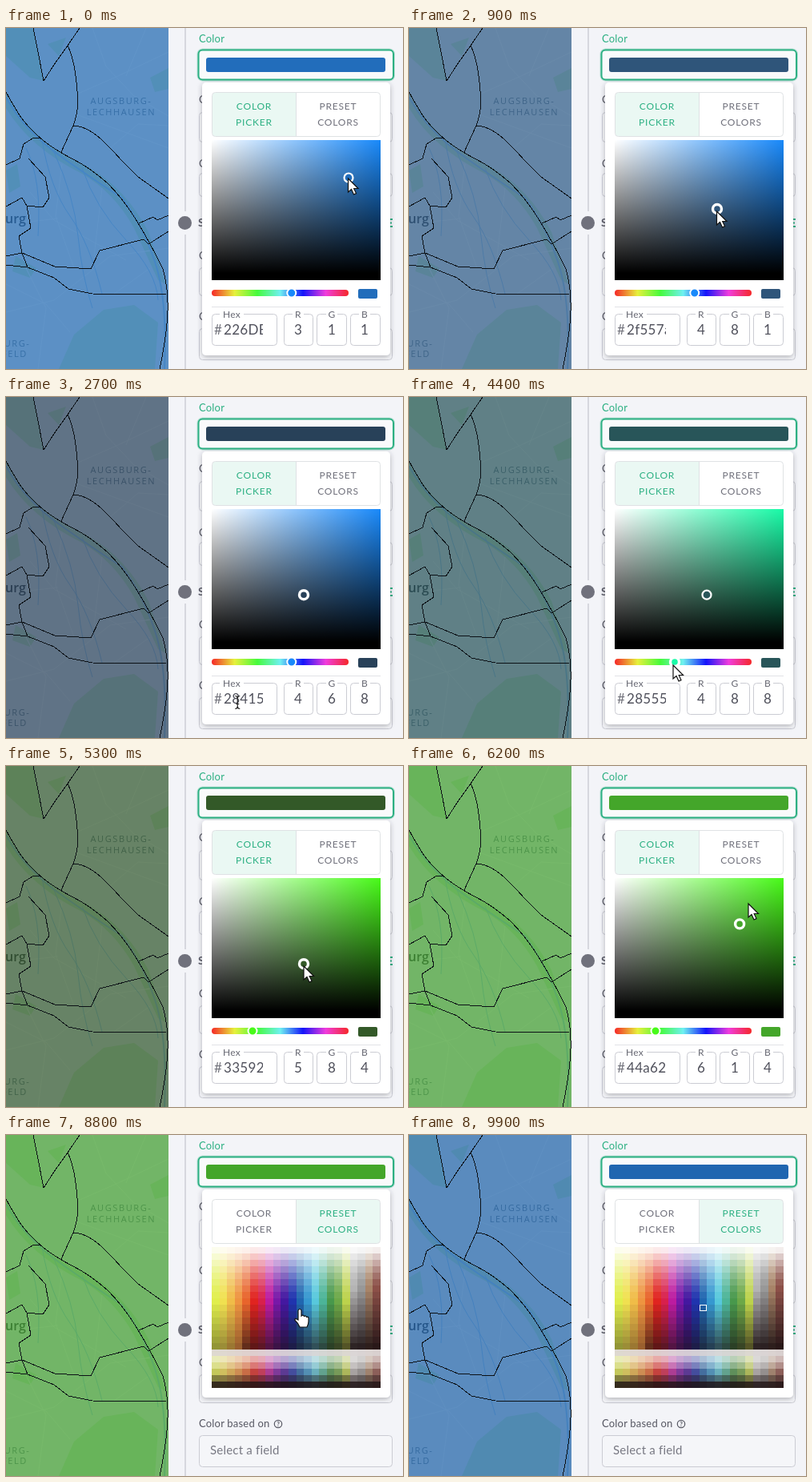
These frames come from a looping animation (496 by 426 pixels, 10000 ms). An HTML page:

```html
<!DOCTYPE html>
<html lang="en">
<head>
<meta charset="utf-8">
<title>Color picker</title>
<style>
  html, body { margin: 0; width: 100%; height: 100%; overflow: hidden; background: #f3f4f8; }
  svg { display: block; width: 496px; height: 426px; font-family: Lato, "Open Sans", sans-serif; }
  .tab { font-size: 12px; letter-spacing: .8px; text-anchor: middle; }
  .label { font-size: 13px; letter-spacing: .2px; fill: #565762; }
  .field { fill: #f5f6f9; stroke: #cbccd3; }
  .place { font-size: 11px; letter-spacing: 1.6px; fill: #5f7486; text-anchor: middle; font-family: "Open Sans", sans-serif; }
  .value { font-size: 17px; letter-spacing: .3px; fill: #50515c; }
  .legend { font-size: 12px; letter-spacing: .3px; fill: #666772; text-anchor: middle; }
</style>
</head>
<body>
<svg viewBox="0 0 496 426">
  <defs>
    <linearGradient id="white"><stop stop-color="#fff"/><stop offset="1" stop-color="#fff" stop-opacity="0"/></linearGradient>
    <linearGradient id="black" x2="0" y2="1"><stop stop-opacity="0"/><stop offset=".95"/></linearGradient>
    <linearGradient id="spectrum"></linearGradient>
    <filter id="shadow" x="-10%" y="-10%" width="120%" height="120%">
      <feDropShadow dx="0" dy="2" stdDeviation="3" flood-color="#30323c" flood-opacity=".35"/>
    </filter>
    <clipPath id="mapClip"><path d="M0 0H203V426H0Z"/></clipPath>
    <clipPath id="hexClip"><path d="M258 365H321V393H258Z"/></clipPath>
  </defs>

  <g clip-path="url(#mapClip)" fill="none">
    <path d="M0 0H203V426H0Z" fill="#c8d2da"/>
    <g fill="#aed0b4">
      <path d="M0 0H34L40 30L47 66L30 62L0 35Z"/>
      <path d="M66 426L85 383L122 352L160 346L190 368L186 426Z"/>
      <path d="M0 80Q25 130 75 160L100 172Q150 200 178 255L200 320L190 315L160 250Q135 205 95 182Q30 150 0 100Z"/>
      <path d="M52 20L75 12L66 35ZM0 178L14 170L18 198L4 206ZM12 285L38 300L30 312L8 304ZM180 62L203 50V76L186 80Z"/>
    </g>
    <g stroke="#d8dfe4">
      <path d="M90 82L140 60L203 30M108 0L125 48L160 85L203 110M88 108L203 150M150 60L175 0M130 150L165 120L203 122"/>
      <path d="M0 320L50 345L80 380M0 355L60 340L130 285L203 275M30 205L60 240L150 290M70 170L62 235L85 300M120 200L110 285M0 245L65 238M40 426L50 350L25 300M135 332L180 300"/>
    </g>
    <g stroke="#8ab4dc">
      <path d="M0 86Q22 128 72 163T145 212Q170 245 186 292T198 426" stroke-width="2"/>
      <path d="M45 140Q55 200 80 235T120 332M60 155Q85 210 90 260T108 350M95 175Q112 225 150 265T190 340M25 150Q45 190 40 260"/>
    </g>
    <g class="place">
      <text x="144" y="95">AUGSBURG-</text><text x="144" y="109">LECHHAUSEN</text>
      <text x="14" y="398">URG-</text><text x="11" y="411">FELD</text>
    </g>
    <text x="-1" y="244" font-size="16" font-weight="600" fill="#303a46" font-family="Open Sans, sans-serif">urg</text>
    <path id="tint" d="M0 0H203V426H0Z" opacity=".65"/>
    <g stroke="#0b1015" shape-rendering="crispEdges">
      <path d="M0 80Q8 95 17 109T47 141Q64 154 84 164T127 194Q147 214 164 242T196 301Q203 325 202 354T192 426"/>
      <path d="M34 0L40 30L47 66L62 43L77 22L92 0M77 22Q82 32 85 47T90 92Q89 110 84 122L69 155"/>
      <path d="M84 122Q103 123 122 142T143 164L165 186L203 213M49 186L54 212L46 224L26 222L20 212L0 223"/>
      <path d="M0 171L17 163L22 145L33 138L42 137M28 163L49 186M26 222L31 250L16 260L20 281L0 285M20 281L27 299L0 296"/>
      <path d="M20 281L61 298L106 301L117 278L172 264L178 270L203 254M166 244L184 236L189 240L203 234"/>
      <path d="M27 299L60 312L78 326L108 332L200 333"/>
    </g>
  </g>

  <path d="M224 0V229M224 258V426" stroke="#d6d7de" stroke-width="2"/>
  <circle cx="223.500" cy="243.500" r="8.500" fill="#70717c"/>
  <g id="form"></g>
  <text x="240" y="248" font-size="14" font-weight="700" fill="#5b5c67">Style</text>
  <path d="M472 239H483M472 243.500H482M472 248H483" stroke="#2db083" stroke-width="2"/>
  <text class="label" x="241" y="365">Color based on</text>
  <circle cx="340" cy="361" r="4.700" fill="none" stroke="#565762" stroke-width="1.200"/>
  <text x="340" y="364" font-size="8" font-weight="700" text-anchor="middle" fill="#565762">?</text>
  <text x="255" y="399" font-size="15" letter-spacing=".2" fill="#777882">Select a field</text>
  <text class="label" x="241" y="18" style="fill:#2db083">Color</text>
  <rect x="240.500" y="27.500" width="243.500" height="37" rx="5" fill="none" stroke="#2db083" stroke-opacity=".3" stroke-width="4"/>
  <rect x="240.500" y="27.500" width="243.500" height="37" rx="5" fill="#f9fafb" stroke="#2db083" stroke-width="2"/>
  <rect id="bar" x="250" y="37" width="224" height="18" rx="3"/>

  <rect id="popover" x="245" y="68" width="235" height="341" rx="5" fill="#fff" filter="url(#shadow)"/>
  <path id="activeTab" fill="#eaf8f3"/>
  <rect x="257.500" y="80.500" width="210" height="55" rx="4" fill="none" stroke="#dfe2e4"/>
  <path d="M362.500 81V135" stroke="#dfe2e4"/>
  <g id="tabA" class="tab"><text x="310" y="102">COLOR</text><text x="310" y="122">PICKER</text></g>
  <g id="tabB" class="tab"><text x="415" y="102">PRESET</text><text x="415" y="122">COLORS</text></g>

  <g id="picker">
    <rect id="pure" x="257" y="140" width="211" height="175"/>
    <rect x="257" y="140" width="211" height="175" fill="url(#white)"/>
    <rect x="257" y="140" width="211" height="175" fill="url(#black)"/>
    <circle id="knob" r="5.500" stroke="#fff"/>
    <rect x="257" y="327" width="171" height="8" rx="4" fill="url(#spectrum)"/>
    <circle id="hueKnob" cy="331" r="5.500" stroke="#fff"/>
    <rect id="chip" x="440" y="326" width="24" height="12" rx="2"/>
    <path d="M257 348.500H468" stroke="#e1e2e6"/>
    <g id="inputs"></g>
    <text class="value" x="260" y="383" fill-opacity=".8">#</text>
    <g clip-path="url(#hexClip)"><text id="hex" class="value" x="272" y="383"></text></g>
  </g>
  <g id="presets">
    <g id="cells" shape-rendering="crispEdges"></g>
    <rect id="chosen" x="363.500" y="212.500" width="8" height="7" fill="none" stroke="#fff"/>
  </g>

  <g id="cursor">
    <path id="arrow" d="M0 0V17L4 13.500L7 20L10 18.600L7.200 12.500H12.500Z" fill="#fff" stroke="#111" stroke-width="1.200"/>
    <path id="beam" d="M-3 -8Q0 -8 0 -5V5Q0 8 -3 8M3 -8Q0 -8 0 -5V5Q0 8 3 8M-2 2H2" fill="none" stroke="#222" stroke-width="1.200"/>
    <path id="hand" d="M-2 1Q0 -2 2 1V8Q4 6 5.500 8.500Q7.500 7 8.500 9.500Q11 8.500 11 11V15Q11 18 9 22H0Q-2 17 -6 13.500Q-6.500 10 -2 13Z" fill="#fff" stroke="#111" stroke-width="1.200"/>
  </g>
</svg>
<script>
const $ = id => document.getElementById(id);
const set = (id, attrs) => { for (const k in attrs) $(id).setAttribute(k, attrs[k]); };
const show = (id, on) => { $(id).style.display = on ? '' : 'none'; };

const LOOP = 10000, STEP = 100, LAG = 200;
const BOX = { x: 257, y: 140, w: 209, h: 165 };
const STRIP = { x: 257, w: 171 };
const START = [34, 109, 187], PRESET = [32, 102, 176];

// Key: [time, x, y]; eased between neighbours.
const knobKeys = [[0, 428, 187], [300, 428, 187], [900, 385, 226], [1400, 363, 217], [1600, 364.7, 192],
  [2000, 372, 247.2], [5300, 372, 247.2], [5900, 413.1, 197.4]];
const hueKeys = [[0, 356.75, 331], [4000, 356.75, 331], [4200, 345, 331], [4400, 332, 331], [4900, 308, 331]];
const cursorKeys = [[2000, 372, 250], [2500, 290, 380], [2800, 289, 382], [3700, 355, 335], [4000, 355, 335],
  [4200, 343, 335], [4400, 330, 335], [4900, 307, 335], [5300, 372, 250], [5900, 413, 200], [6200, 424, 172],
  [6600, 416, 112], [6900, 414, 112], [7800, 310, 238], [8700, 367, 218], [9100, 367, 218], [9600, 440, 290]];

function track(keys, t, ease = u => u * u * (3 - 2 * u)) {
  const i = keys.findIndex(k => k[0] > t);
  if (i < 0) return keys[keys.length - 1].slice(1);
  if (i === 0) return keys[0].slice(1);
  const [a, b] = [keys[i - 1], keys[i]], u = ease((t - a[0]) / (b[0] - a[0]));
  return [a[1] + (b[1] - a[1]) * u, a[2] + (b[2] - a[2]) * u];
}
const hueXAt = t => track(hueKeys, t, u => u)[0];
const hueAt = t => (hueXAt(t) - STRIP.x) / STRIP.w * 360;

function hsv(h, s, v) {
  const channel = n => {
    const k = (n + h / 60) % 6;
    return Math.round(255 * v * (1 - s * Math.max(0, Math.min(k, 4 - k, 1))));
  };
  return [channel(5), channel(3), channel(1)];
}
const rgb = c => `rgb(${c.map(Math.round)})`;
const toHex = c => c.map(n => n.toString(16).padStart(2, '0')).join('');
const fromHex = h => [0, 2, 4].map(i => parseInt(h.slice(i, i + 2), 16));
const mix = (a, b, u) => a.map((n, i) => n + (b[i] - n) * u);

function presetShade(base, row, col) {
  const white = [255, 255, 255], dark = [28, 16, 18];
  const toward = u => base => u < 0 ? mix(base, white, -u) : mix(base, dark, u);
  if (row === 16) return mix([222, 216, 216], base, .06);
  if (row > 16) return toward([-.55, -.28, .05, .42, .86][row - 17])(mix(base, [160, 145, 140], .3));
  const turn = col < 18 ? 8 : 6;
  if (row < turn) return toward(-.9 * Math.pow(1 - row / turn, 1.4))(base);
  const depth = col < 4 ? .4 : col < 18 ? .65 : .88;
  return toward((row - turn) / (15 - turn) * depth)(base);
}

function build() {
  const rainbow = ['f52828', 'e6f03c', '46fa3c', '6ef0f0', '1414fa', 'f03cdc', 'f52828'];
  $('spectrum').innerHTML = rainbow.map((c, i) => `<stop offset="${i / 6}" stop-color="#${c}"/>`).join('');

  $('form').innerHTML = [[94, 105, 38], [174, 181, 30], [289, 299, 36], [null, 375, 40]].map(([label, y, h]) =>
    `<rect class="field" x="241.5" y="${y + .5}" width="241" height="${h - 1}" rx="4"/>` +
    (label ? `<text class="label" x="241" y="${label}">Color</text>` : '')).join('');

  $('inputs').innerHTML = [['Hex', 257, 82, 282], ['R', 347, 37, 365], ['G', 388, 38, 407], ['B', 430, 38, 448]]
    .map(([name, x, w, mid]) => {
      const gap = name.length * 8 + 6;
      return `<rect x="${x + .5}" y="357.500" width="${w - 1}" height="39" rx="4" fill="#fff" stroke="#cbccd3"/>
        <rect x="${mid - gap / 2}" y="355" width="${gap}" height="6" fill="#fff"/>
        <text class="legend" x="${mid}" y="362">${name}</text>` +
        (name === 'Hex' ? '' : `<text id="val${name}" class="value" x="${mid}" y="383" text-anchor="middle"></text>`);
    }).join('');

  const hues = ('e0ee4c f0e050 f0bc48 ee9440 e8642c e02420 d8204c bc1ca0 7818a8 4418a0 2034ae ' +
    '2066b0 3698d0 58c8dc 4cb498 48984c 6ca848 bcd24c b4b4b4 989898 a88468 8c5048').split(' ').map(fromHex);
  const w = 211 / 22;
  $('cells').innerHTML = Array.from({ length: 484 }, (_, i) => {
    const col = i % 22, row = Math.floor(i / 22);
    return `<rect x="${257 + col * w}" y="${140 + row * 8}" width="${w + .3}" height="8" fill="${rgb(presetShade(hues[col], row, col))}"/>`;
  }).join('');
}

// The applied hue trails the slider slightly.
function currentColor(t, [x, y]) {
  if (t < 400) return START;
  if (t >= 8900) return PRESET;
  return hsv(hueAt(t - LAG), (x - BOX.x) / BOX.w, 1 - (y - BOX.y) / BOX.h);
}

function cursorAt(t, knob) {
  if (t < 2000) return [knob[0] - .5, knob[1] + Math.min(3, 1 + t / 400)];
  return track(cursorKeys, t);
}

function draw(t) {
  const knob = track(knobKeys, t);
  const pure = rgb(hsv(hueAt(t), .9, .98));
  const color = currentColor(t, knob), fill = rgb(color);
  const presets = t >= 6800;

  for (const id of ['bar', 'chip', 'knob']) set(id, { fill });
  // The map repaints a moment after the knob moves.
  set('tint', { fill: rgb(currentColor(t, track(knobKeys, t - LAG))) });

  const hueFocus = t >= 3900 && t < 5300;
  set('knob', { cx: knob[0], cy: knob[1], 'stroke-width': t >= 300 && !hueFocus ? 3.4 : 2.2 });
  set('hueKnob', { cx: hueXAt(t), fill: pure, 'stroke-width': hueFocus ? 3.4 : 2 });
  set('pure', { fill: pure });

  const text = toHex(color);
  $('hex').textContent = t < 400 ? text.toUpperCase() : text;
  ['R', 'G', 'B'].forEach((n, i) => { $('val' + n).textContent = String(color[i])[0]; });

  show('picker', !presets);
  show('presets', presets);
  show('chosen', t >= 8900);
  set('popover', { height: presets ? 260 : 341 });
  set('activeTab', { d: presets ? 'M363 81H464Q467 81 467 84V132Q467 135 464 135H363Z' : 'M362 81H261Q258 81 258 84V132Q258 135 261 135H362Z' });
  set('tabA', { fill: presets ? '#70717c' : '#2db083' });
  set('tabB', { fill: presets ? '#2db083' : '#70717c' });

  const kind = t >= 2500 && t < 3100 ? 'beam' : t >= 6500 ? 'hand' : 'arrow';
  for (const id of ['arrow', 'beam', 'hand']) show(id, id === kind);
  show('cursor', t < 9600);
  set('cursor', { transform: `translate(${cursorAt(t, knob)})` });
}

build();
const begin = performance.now();
function tick() {
  const t = (performance.now() - begin) % LOOP;
  draw(Math.floor(t / STEP) * STEP);
  requestAnimationFrame(tick);
}
tick();
</script>
</body>
</html>
```
